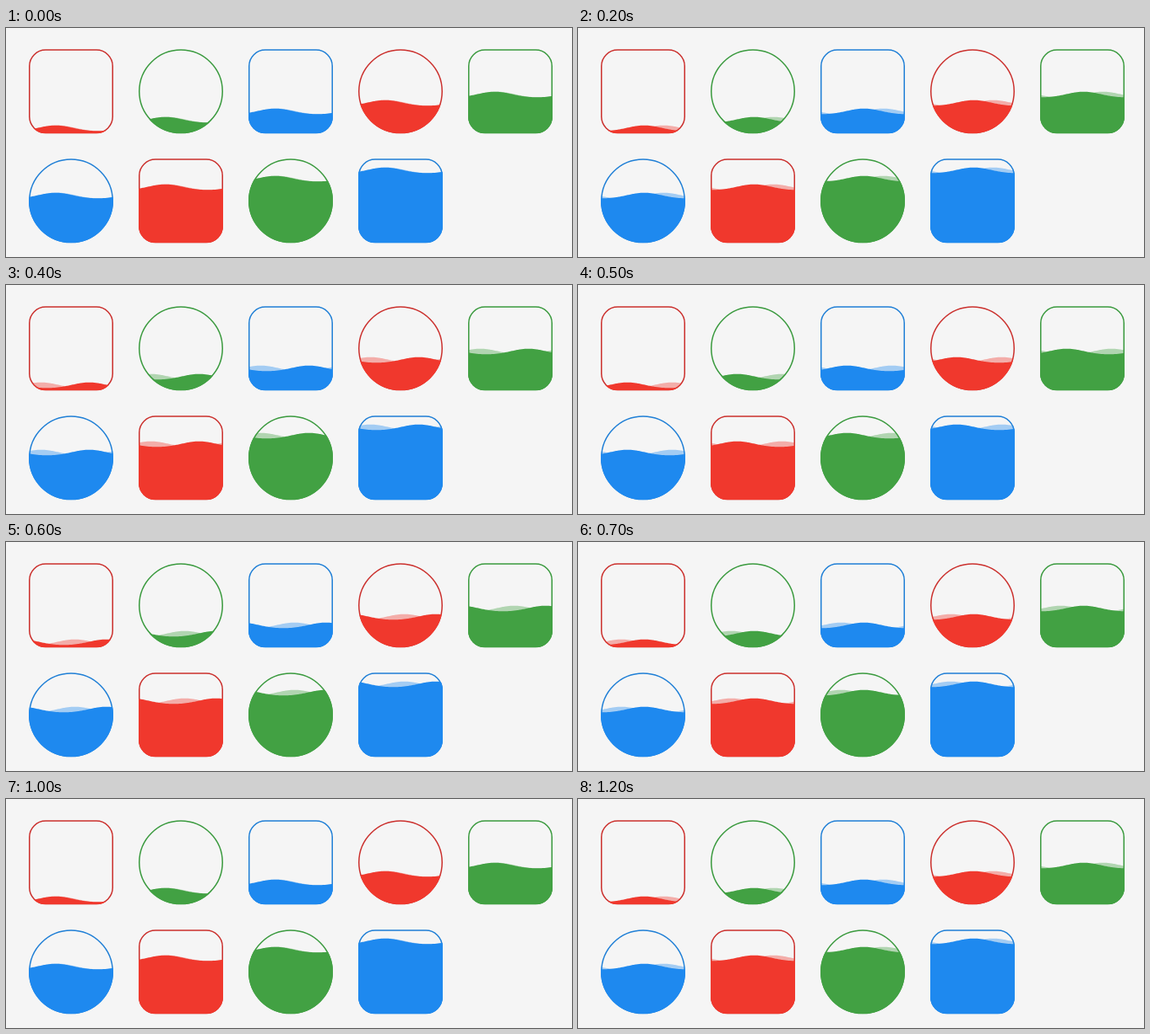
Write an HTML page with a canvas that moves like this. It is 670 px wide and 272 px high and loops after 1.3 s.

```html
<!DOCTYPE html>
<html lang="en">
<head>
<meta charset="utf-8">
<title>Liquid gauges</title>
<style>
  html, body { margin: 0; width: 100%; height: 100%; overflow: hidden; background: #f5f5f5; }
  canvas { display: block; }
</style>
</head>
<body>
<canvas id="stage" width="670" height="272"></canvas>
<script>
const ctx = document.getElementById('stage').getContext('2d');

const SIZE = 100, PITCH = 130, LEFT = 27, TOP = 25.3;
const WAVE_HEIGHT = 6.6, LINE = 1.5;
const STEP_MS = 100, STEPS = 13;

const COLORS = [
  { fill: '#f0382d', line: '#cb302d' },
  { fill: '#42a143', line: '#3a9a3e' },
  { fill: '#1e89ef', line: '#1f7fd6' }
];

function outline(round, inset) {
  const side = SIZE - 2 * inset;
  ctx.beginPath();
  ctx.roundRect(inset, inset, side, side, round ? side / 2 : 20 - inset);
}

// Fills everything below a wave whose crest sits at x = crest, y = level.
function wave(crest, level, alpha) {
  ctx.globalAlpha = alpha;
  ctx.beginPath();
  ctx.moveTo(0, SIZE);
  for (let x = 0; x <= SIZE; x++) {
    const a = (x - crest) / SIZE * 2 * Math.PI;
    const drop = (1 - Math.cos(a)) / 2 + 0.08 * Math.sin(a) ** 2;
    ctx.lineTo(x, level + WAVE_HEIGHT * drop);
  }
  ctx.lineTo(SIZE, SIZE);
  ctx.fill();
  ctx.globalAlpha = 1;
}

function gauge(i, front, back) {
  const { fill, line } = COLORS[i % 3];
  const round = i % 2 === 1;
  const level = SIZE - 10 * (i + 1) + 0.4;

  ctx.save();
  ctx.translate(LEFT + i % 5 * PITCH, TOP + Math.floor(i / 5) * PITCH);

  outline(round, LINE / 2);
  ctx.strokeStyle = line;
  ctx.lineWidth = LINE;
  ctx.stroke();

  outline(round, 0);
  ctx.clip();
  ctx.fillStyle = fill;
  wave(back, level, 0.38);
  wave(front, level, 1);
  ctx.restore();
}

function draw(now) {
  const step = Math.floor(now / STEP_MS) % STEPS;
  // The front wave runs right, the back wave left at half its speed.
  const front = 31.5 + 60 * step;
  const back = 34.5 - 30 * step;

  ctx.fillStyle = '#f5f5f5';
  ctx.fillRect(0, 0, 670, 272);
  for (let i = 0; i < 9; i++) gauge(i, front, back);
}

const start = performance.now();
function tick() {
  draw(performance.now() - start);
  requestAnimationFrame(tick);
}
tick();
</script>
</body>
</html>
```
